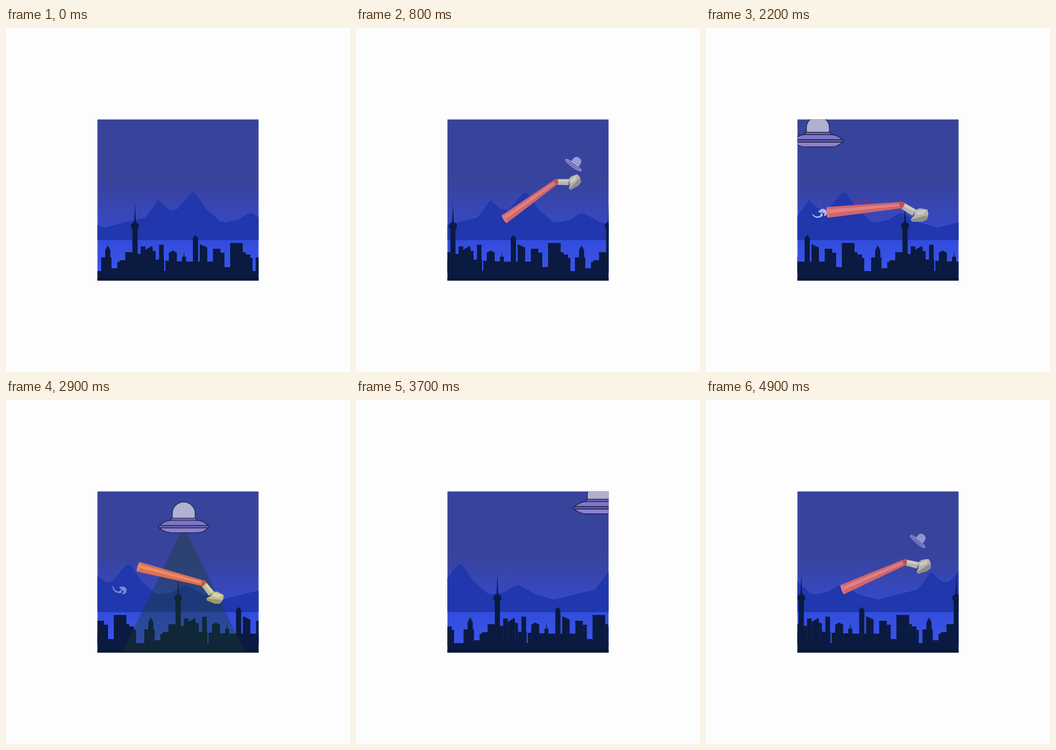
Write an HTML page with a canvas that moves like this. It is 600 by 600 pixels and loops after 5000 ms.

```html
<!DOCTYPE html>
<html lang="en">
<head>
<meta charset="utf-8">
<title>Night flight</title>
<style>
  html, body { margin: 0; width: 100%; height: 100%; overflow: hidden; background: #fdfdfd; }
  canvas { display: block; width: 600px; height: 600px; }
</style>
</head>
<body>
<canvas id="stage"></canvas>
<script>
const LOOP = 5000, STEP = 100, CYCLE = 4000;
const canvas = document.getElementById('stage');
const ratio = window.devicePixelRatio || 1;
canvas.width = canvas.height = 600 * ratio;
const ctx = canvas.getContext('2d');
ctx.scale(ratio, ratio);

// Bends of the ridge, x from the tallest peak.
const ridge = [
  -155,348, -116,338, -85,331, -73,316, -62,300, -45,315, -37,318, -29,316, -16,301, -4,287,
  2,287, 22,316, 46,337, 54,339, 76,335, 94,324, 101,323, 130,339, 163,348
];

// Buildings: left (from the tower), width, top, roof rise, place of the roof peak.
const blocks = [
  [-59, 18, 400], [-52, 9, 388, 9], [-41, 10, 419], [-31, 5, 408], [-27, 25, 405], [-17, 13, 391],
  [-4.5, 9, 345], [-1.5, 3, 340, 34], [4, 6, 394], [10, 8, 381], [18, 13, 387, 7, .9], [31, 5, 389],
  [36, 15, 404], [42, 8, 378], [53, 20, 406], [59, 14, 392, 4], [73, 16, 407], [82, 7, 399],
  [84.5, 2, 399, 10], [89, 61, 407.5], [101, 9, 366, 5], [113, 13, 383, 6, 0], [136, 13, 385],
  [149, 7, 392], [156, 10, 417], [166, 22, 375], [188, 5, 391], [193, 8, 395], [201, 4, 401]
];

const ramp = (t, a, b) => Math.min(1, Math.max(0, (t - a) / (b - a)));
const pulse = (t, a, b, c, d) => ramp(t, a, b) - ramp(t, c, d);

function random(seed) {
  return () => (seed = seed * 16807 % 2147483647) / 2147483647;
}

function poly(pts, color, dx = 0) {
  ctx.beginPath();
  for (let i = 0; i < pts.length; i += 2) ctx.lineTo(pts[i] + dx, pts[i + 1]);
  ctx.fillStyle = color;
  ctx.fill();
}

function line(x0, y0, x1, y1, color, width) {
  ctx.beginPath();
  ctx.moveTo(x0, y0);
  ctx.lineTo(x1, y1);
  ctx.strokeStyle = color;
  ctx.lineWidth = width;
  ctx.stroke();
}

function shape(path, fill, stroke, width = 1) {
  const p = new Path2D(path);
  ctx.fillStyle = fill;
  ctx.fill(p);
  if (!stroke) return;
  ctx.strokeStyle = stroke;
  ctx.lineWidth = width;
  ctx.stroke(p);
}

function fade(y0, y1, from, to) {
  const g = ctx.createLinearGradient(0, y0, 0, y1);
  g.addColorStop(0, from);
  g.addColorStop(1, to);
  return g;
}

function place(x, y, angle, scale, alpha, draw) {
  if (alpha <= 0 || scale <= 0) return;
  ctx.save();
  ctx.translate(x, y);
  ctx.rotate(angle * Math.PI / 180);
  ctx.scale(scale, scale);
  ctx.globalAlpha = alpha;
  draw();
  ctx.restore();
}

function sky() {
  ctx.fillStyle = fade(270, 370, '#38439c', '#364bd2');
  ctx.fillRect(159, 159, 282, 211);
  ctx.fillStyle = fade(370, 425, '#324cdc', '#3c55ec');
  ctx.fillRect(159, 370, 282, 60);
}

function mountains(t) {
  const x = 327.4 - .039 * t;
  for (const dx of [-318, 0, 318]) poly([-155, 370, ...ridge, 163, 370], '#2037ad', x + dx);
}

function city(t) {
  const dark = '#0a1a40';
  for (const x of [225 - .07 * t, 494.5 - .067 * t, 779.5 - .07 * t]) {
    for (const [left, w, top, rise = 0, peak = .5] of blocks) {
      poly([left, 425, left, top, left + w * peak, top - rise, left + w, top, left + w, 425], dark, x);
    }
    ctx.beginPath();
    ctx.arc(x, 345.5, 7, 0, 7);
    ctx.fill();
  }
  ctx.fillRect(159, 424, 282, 17);
  ctx.fillStyle = '#091636';
  ctx.fillRect(159, 435, 282, 6);
}

// warm goes from 0 to 1 in the light of the beam.
function arm(warm) {
  const tone = (r, g, b) => `rgb(${r + 10 * warm}, ${g + 12 * warm}, ${b - 28 * warm})`;
  const grey = tone(182, 179, 173), pale = tone(205, 202, 195), shade = tone(144, 142, 138);
  poly([51, -18, 54, -19, 73, -8, 67, 3, 48, -9], grey);
  poly([53, -18, 72, -8, 70, -4, 51, -14], pale);
  poly([71, -7, 80, -10, 93, -8, 95, -1, 92, 10, 83, 13.5, 66, 13, 64, 9, 70, 3], grey);
  poly([74, -5, 91, -7, 86, 0, 74, 1], pale);
  poly([65, 9, 78, 6, 92, 2, 92, 10, 83, 13.5, 66, 13], shade);
  poly([-81, -12.5, 52, -21.5, 51, -10.5, -80, 6.5], tone(209, 101, 107));
  poly([-81, -8, 44, -17.5, 44, -14, -81, -1], tone(221, 130, 133));
  poly([44, -21, 52, -21.5, 53, -15, 46, -10], tone(190, 78, 90));
  ctx.beginPath();
  ctx.ellipse(-80.5, -3, 2.5, 9.5, -.05, 0, 7);
  ctx.fillStyle = tone(215, 122, 126);
  ctx.fill();
}

function hat() {
  const wire = '#c6c6f0';
  shape('M-7-1V-7A8 8 0 0 1 9-7V-1Z', '#aaaade');
  for (let i = -4; i <= 6; i += 5) line(i, -13, i, -2, wire, .7);
  for (let y = -11; y < 0; y += 4) line(-6, y, 8, y, wire, .7);
  shape('M-17 1.5A17 3.8 0 0 1 17 1.5 17 3.8 0 0 1-17 1.5Z', '#7778c6', wire, .9);
  line(-15, 1.5, 15, 1.5, wire, .8);
}

function saucer() {
  const part = (path, color) => shape(path, color, '#17173c', 1.1);
  part('M-20-14V-23A20 20 0 0 1 20-23V-14Z', '#b0b0d0');
  part('M-21-15H21L24-10H-24Z', '#6d6bae');
  part('M-43-2C-37-7-29-11-22-11H22C30-11 38-7 43-2Z', '#7f76ca');
  part('M-43 2C-37 7-29 10.5-22 10.5H24C31 10.5 38 7 43 2Z', '#8a80d2');
  part('M-43-2H43L46 0 43 2H-43L-45 0Z', '#6864aa');
}

function puff() {
  shape('M-13-5C-10 2-6 5-1 4L3 0 4 5C-2 9-12 6-13-3Z', '#c9d2fa');
  shape('M-2-3C3-8 11-6 12-1 13 5 9 8 5 7L8 2Z', '#c0c9f6');
  shape('M1-2Q9-3 7 4Q5 0 1 0Z', '#8f9be6');
}

function sparks() {
  const rnd = random(77);
  for (let i = 0; i < 26; i++) {
    const x = 257 + 25 * rnd(), y = 299 + 8 * rnd();
    line(x, y, x + 2 + 3 * rnd(), y - 1 + 2 * rnd(), '#9a2c58', 1);
  }
}

function beam(x, alpha) {
  place(x, 0, 0, 1, alpha, () => poly([-5, 231, 5, 231, 108, 441, -108, 441], 'rgba(24, 62, 38, .38)'));
}

function drawHat(u) {
  const late = u - 800, drop = Math.max(0, 9 - u / 100);
  const alpha = Math.min(.75, 1.3 - .00068 * u) * ramp(u, 300, 500);
  place(380 - .098 * late, 240 + .056 * late - 2 * drop * drop, 35.5 + .045 * late, 1 - .0003 * late, alpha, hat);
}

// Spins in, rests, then is drawn up into the saucer.
function drawArm(u) {
  const k = Math.max(0, 10.5 - u / 100), m = Math.max(0, u / 100 - 27);
  place(293 + 10.8 * k + 2.75 * m, 324.5 - 9.5 * k - 1.1 * m ** 2.5, 10 * m - 12 * k,
    1 - .057 * k - .025 * m * m, ramp(u, 300, 600), () => arm(ramp(u, 2650, 2900)));
}

function frame(t) {
  const u = t % CYCLE;
  const come = Math.min(0, u - 2860) * .174, leave = Math.max(0, u - 3200) * .227;
  const shipX = 310 + come + leave;
  const sway = Math.sin((u - 1400) * Math.PI / 1300);

  ctx.fillStyle = '#fdfdfd';
  ctx.fillRect(0, 0, 600, 600);
  ctx.save();
  ctx.beginPath();
  ctx.rect(159.5, 159.5, 281, 281);
  ctx.clip();
  sky();
  mountains(t);
  city(t);
  beam(shipX, pulse(u, 2650, 2850, 3200, 3350));
  drawHat(u);
  place(0, 0, 0, 1, .7 * pulse(u, 1700, 2000, 2200, 2600), sparks);
  place(198.5, 328 - 5 * sway, -22 * sway, 1, .9 * pulse(u, 1100, 1300, 2700, 3200), puff);
  drawArm(u);
  place(shipX, 221 + .21 * come - .29 * leave, 0, 1, 1, saucer);
  ctx.restore();
}

const start = performance.now();
function tick() {
  const t = (performance.now() - start) % LOOP;
  frame(Math.floor(t / STEP) * STEP);
  requestAnimationFrame(tick);
}
tick();
</script>
</body>
</html>
```
